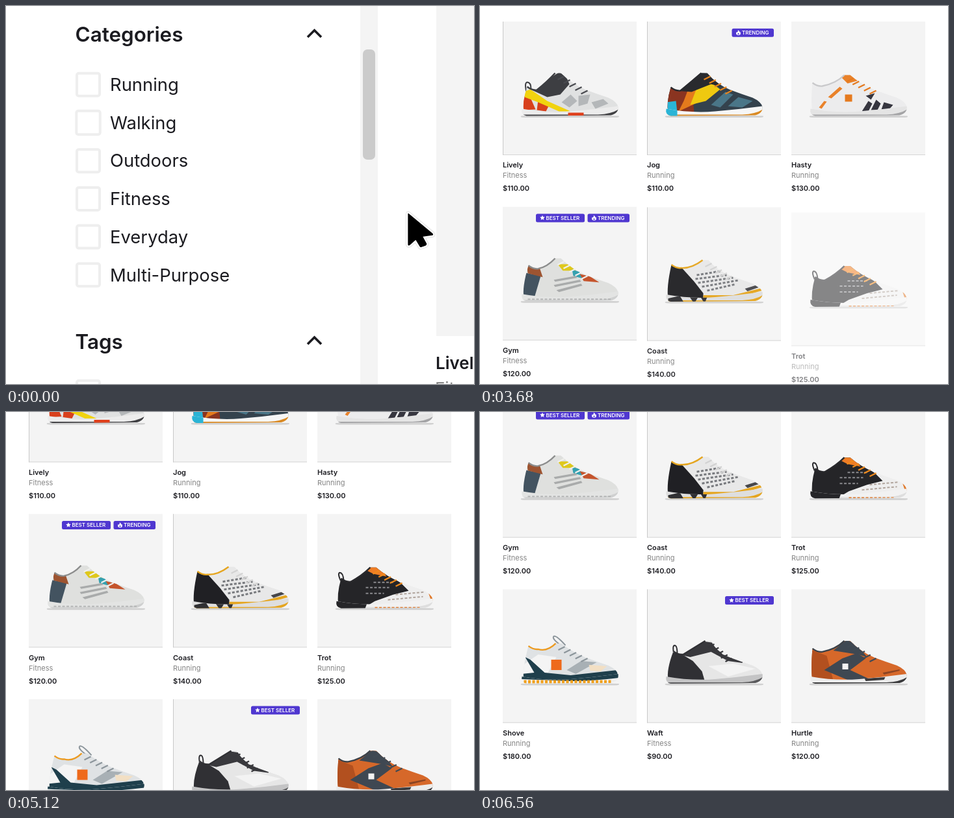
An HTML page with a canvas for the animation above (6960 ms loop, 720x583 px).

```html
<!DOCTYPE html>
<html lang="en">
<head>
<meta charset="utf-8">
<title>Shoe shop filter</title>
<style>
html, body { margin: 0; width: 720px; height: 583px; background: #fff; }
canvas { display: block; }
</style>
</head>
<body>
<canvas id="stage" width="720" height="583"></canvas>
<script>
const ctx = document.getElementById('stage').getContext('2d');
const LOOP = 6960, INK = '#1b1b20', PURPLE = '#4f37d0', PALE = '#f4f4f4';

const clamp = v => Math.min(1, Math.max(0, v));
const span = (t, a, b) => clamp((t - a) / (b - a));
const ease = t => 1 - (1 - t) ** 2 * (1 + t / 2);
const mix = (a, b, p) => a + (b - a) * p;

function fill(color, path) {
  ctx.fillStyle = color;
  ctx.fill(typeof path === 'string' ? new Path2D(path) : path);
}
function line(color, width, path) {
  ctx.strokeStyle = color;
  ctx.lineWidth = width;
  ctx.stroke(new Path2D(path));
}
function rect(color, x, y, w, h, r = 0) {
  ctx.beginPath();
  ctx.roundRect(x, y, w, h, r);
  ctx.fillStyle = color;
  ctx.fill();
}
function text(str, x, y, size, weight = 400, color = INK) {
  ctx.font = `${weight} ${size}px Inter, sans-serif`;
  ctx.fillStyle = color;
  ctx.fillText(str, x, y);
}
function at(x, y, draw) {
  ctx.save();
  ctx.translate(x, y);
  draw();
  ctx.restore();
}

// ---- Filter panel ----
const options = ['Running', 'Walking', 'Outdoors', 'Fitness', 'Everyday', 'Multi-Purpose'];
const rowY = i => 121 + i * 58.7;

function emptyBox(y, grow = 0) {
  ctx.strokeStyle = '#eeeeee';
  ctx.lineWidth = 4;
  ctx.beginPath();
  ctx.roundRect(109 - grow, y - 17.2 - grow, 35 + 2 * grow, 35 + 2 * grow, 3);
  ctx.stroke();
}
function tick(y, t, press, release) {
  const on = span(t, press, press + 150);
  if (!on) return;
  ctx.globalAlpha = on * (1 - span(t, release, release + 90)) * .25;
  ctx.beginPath();
  ctx.arc(126.3, y, mix(20, 36, on), 0, 7);
  ctx.fillStyle = PURPLE;
  ctx.fill();
  ctx.globalAlpha = on;
  rect(PURPLE, 107, y - 20, 39, 39, 3);
  line('#fff', 2.4, `M116 ${y + 1}L123 ${y + 8.5} 137 ${y - 9}`);
  ctx.globalAlpha = 1;
}
function heading(str, y) {
  text(str, 106.5, y, 31.4, 600);
  line(INK, 3.6, `M464 ${y - 7}L474.5 ${y - 17.5} 485 ${y - 7}`);
}
function cursor(x, y) {
  at(x, y, () => {
    const shape = 'M0 1Q0-1 2 1L38 31Q40 34 37 34L23 36 29 47Q29 49 27 50L21 52Q19 53 18 51L12 41 3 49Q0 51 0 48Z';
    ctx.lineJoin = 'round';
    line('#e2e2e2', 6.4, shape);
    line('#fff', 4.6, shape);
    fill('#000', shape);
  });
}
function panel(t) {
  heading('Categories', 55);
  heading('Tags', 528.5);
  options.forEach((name, i) => {
    emptyBox(rowY(i), i === 1 ? .7 : 0);
    text(name, 160, rowY(i) + 10, 27.4);
  });
  emptyBox(595);
  rect(PALE, 545, 0, 27, 583);
  rect('#cbcbcb', 549, 67, 19, 170, 7);
  rect(PALE, 662, 0, 58, 509);
  text(shoes[0].name, 661, 560, 26, 600);
  text('Fitness', 660, 599, 26, 400, '#888');
  tick(rowY(0), t, 1140, 1370);
  tick(rowY(3), t, 1930, 2190);
  const a = ease(span(t, 0, 1100)), b = ease(span(t, 1390, 1960));
  cursor(mix(619, 128, a) + 4 * b, mix(320, 126, a) + 173 * b);
}

// ---- Shoes: patches clipped to a silhouette; a third value makes a dashed line of that width ----
const shoes = [
  { name: 'Lively', kind: 'Fitness', price: 110, tags: [], heel: [9, 22], top: [57, 1],
    body: '#e0e1e1', collar: '#3d3e42', lace: '#4a4b50', mid: '#ececec', out: '#414144',
    loop: 'M9 34Q4 16 9 15 15 15 15 26',
    art: [['#d8401c', 'M2 38L12 34 22 57 3 58ZM26 42L42 52 38 60 24 58Z'],
      ['#f1d30f', 'M3 30L14 26 40 44 76 60H58L26 46 5 38Z'],
      ['#3d3e42', 'M16 27L48 6 58 0 68 4 74 18 60 34 40 38Z'],
      ['#b4b7b9', 'M62 46L76 34 86 44 74 54ZM88 36L106 34 102 48 88 52ZM108 46L126 41 134 48 114 56Z']],
    tread: [['#e0401c', 'M72 62H96V70H72Z']] },
  { name: 'Jog', kind: 'Running', price: 110, tags: ['TRENDING'], heel: [8, 23], top: [60, 1],
    body: '#34424d', collar: '#292a2e', lace: '#e8841c', mid: '#f6f6f6', out: '#d98a24',
    art: [['#8a3420', 'M0 20L40 22 44 62H0Z'], ['#e47a1c', 'M34 28L50 20 46 48 20 60 28 44Z'],
      ['#efc910', 'M48 24L72 17 84 26 62 44 38 50Z'], ['#292a2e', 'M14 28L52 0 72 2 86 22 70 18 40 30Z'],
      ['#4a7688', 'M70 50L92 30 104 34 84 54ZM96 52L112 38 134 44 118 54Z'],
      ['#2ab4d6', 'M0 46L16 44 18 62H0Z']],
    tread: [['#2ab4d6', 'M0 54H18V70H0Z']] },
  { name: 'Hasty', kind: 'Running', price: 130, tags: [], heel: [4, 16], top: [58, 4],
    body: '#ececed', collar: '#c9c9cb', lace: '#e57a1e', mid: '#e4e4e4', out: '#a4a4a6',
    art: [['#e9822a', 'M14 54L22 44 26 45 18 56ZM28 38L46 22 50 25 33 40ZM46 5L62 2 76 12 58 17Z'],
      ['#e57a1e', 'M54 34h11v11h-11z'],
      ['#36363f', 'M80 60L90 44 96 48 90 60ZM94 58L102 42 109 48 104 58ZM110 57L114 46 128 50 122 57ZM86 36L100 32 94 42Z']],
    tread: [] },
  { name: 'Gym', kind: 'Fitness', price: 120, tags: ['TRENDING', 'BEST SELLER'], heel: [11, 12], top: [57, 1],
    body: '#dfe0de', collar: '#8b8c8c', lace: '#f0f0ee', mid: '#e3e4e3', out: '#cfd0d0',
    art: [['#435360', 'M0 22L30 28 20 62H0Z'], ['#9d5431', 'M8 8L28 15 33 30 10 24Z'],
      ['#dfc81c', 'M56 10L74 10 84 20 64 20Z'], ['#35a1b0', 'M78 18L90 22 94 32 80 28Z'],
      ['#c5542c', 'M90 25L106 29 120 38 96 36Z'],
      ['#a9abab', 'M50 34L84 28 86 31 52 37ZM50 42L90 34 92 37 52 45ZM54 50L92 40 94 43 58 53Z']],
    tread: [['#b5b6b6', 'M10 64H140', 2]] },
  { name: 'Coast', kind: 'Running', price: 140, tags: [], heel: [9, 10], top: [62, 3],
    body: '#e8e8e8', collar: '#e5a51f', lace: '#d2d2d2', mid: '#dedede', out: '#e5a51f',
    art: [['#202024', 'M0 8L26 16 44 36 58 54V62H0Z'], ['#e5a51f', 'M58 57L104 57 148 46V50L106 62H58Z'],
      ['#77797d', 'M48 26L84 20M46 32L94 26M50 38L104 30M56 44L112 34M64 50L108 40', 3],
      ['#47474b', 'M122 47L138 42 143 45 126 51Z']],
    tread: [['#303033', 'M4 62L22 58 28 68H4ZM36 58L50 60 44 70ZM54 60H64L60 70Z']] },
  { name: 'Trot', kind: 'Running', price: 125, tags: [], heel: [8, 21], top: [58, 4],
    body: '#eeeeee', collar: '#29292c', lace: '#f08a1c', mid: '#f2f2f2', out: '#dedede',
    loop: 'M8 26Q2 13 6 12 11 12 12 24',
    art: [['#252528', 'M0 0H58L100 28 112 40 88 46 60 56 50 62H0Z'], ['#ee7d25', 'M46 8L56 0 70 6 78 18 58 14Z'],
      ['#8a8a8e', 'M58 27H88M46 35H82M46 44H74', 2],
      ['#b0a49c', 'M92 46L136 42M80 54L134 49', 2], ['#e07a2c', 'M142 42L150 44V56L146 54Z']],
    tread: [['#252528', 'M0 54H50L44 70H0Z'], ['#e07a2c', 'M60 66H130', 2]] },
  { name: 'Shove', kind: 'Running', price: 180, tags: [], heel: [11, 9], top: [58, 5],
    body: '#dfe2e4', collar: '#ec9b22', lace: '#8c959b', mid: '#f0f0f0', out: '#f0f0f0',
    loop: 'M64 10Q46-2 50-6 54-8 68 8',
    art: [['#f4f4f4', 'M0 40L26 22 54 26 40 52 0 60Z'], ['#1f3f4c', 'M6 26L14 30 36 50 76 54 148 46V62H0V52L20 50Z'],
      ['#ee6a1c', 'M46 30h16v16h-16z'], ['#a8b0b5', 'M70 46L92 32 116 34 84 52Z'],
      ['#f2dfc4', 'M104 38L132 40 122 48 106 47Z']],
    tread: [['#1f3f4c', 'M0 54Q40 62 76 59T150 51V58Q100 64 76 63T0 60Z'],
      ['#f0a01c', 'M4 64H140', 5]] },
  { name: 'Waft', kind: 'Fitness', price: 90, tags: ['BEST SELLER'], heel: [12, 17], top: [66, 1],
    body: '#e6e6e6', collar: '#303034', lace: '#38383c', mid: '#c4c4c5', out: '#5a5a5c',
    loop: 'M13 22Q10 8 14 8 18 8 18 22',
    art: [['#303034', 'M0 16L24 21 42 32 56 48 60 62H0Z'],
      ['#39393d', 'M20 22L60 2 74 4 88 22 120 31 118 35 96 32 70 18 38 26Z'],
      ['#f3f3f3', 'M66 40L104 36 138 44 96 56Z']],
    tread: [] },
  { name: 'Hurtle', kind: 'Running', price: 120, tags: [], heel: [4, 13], top: [58, 1],
    body: '#d6682a', collar: '#3a4149', lace: '#414a54', mid: '#ececec', out: '#3a3a3c',
    art: [['#b2501f', 'M0 14L26 24 36 62H0Z'], ['#3f4852', 'M22 46L50 28 72 20 86 28 62 46 92 60 60 62Z'],
      ['#3f4852', 'M36 16L56 0 70 4 88 26 74 22Z'], ['#f3f3f3', 'M50 36h9v9h-9z'],
      ['#8b4524', 'M112 50L138 45 138 47 114 53Z']],
    tread: [['#3a3a3c', 'M84 59L116 57 114 61 86 63Z']] }
];

const SOLE = new Path2D('M1 56Q40 63 76 60T149 52Q151 62 138 66L8 67Q-1 65 1 56Z');

function patches(list, clip) {
  ctx.save();
  ctx.clip(clip);
  ctx.setLineDash([4, 2.5]);
  for (const [color, path, width] of list) width ? line(color, width, path) : fill(color, path);
  ctx.restore();
}
function drawShoe(s) {
  const [hx, hy] = s.heel, [tx, ty] = s.top;
  const collar = `M${hx} ${hy}Q${hx + 8} ${hy + 6} ${hx + 15} ${hy + 5}Q40 ${ty + 13} ${tx - 5} ${ty}`;
  const body = new Path2D(`${collar}L${tx + 4} ${ty}Q78 18 100 27 116 33 134 39 147 45 149 53Q150 60 140 62L4 62Q1 46 ${hx} ${hy}Z`);
  fill('#d0d0d0', 'M0 67Q75 65 150 67Q152 69 146 69.5L4 69.5Q-3 69 0 67Z');
  if (s.loop) line(s.collar === '#ec9b22' ? s.lace : s.collar, 2, s.loop);
  fill(s.body, body);
  patches(s.art, body);
  line(s.collar, 2.4, collar);
  for (let k = 0; k < 5; k++) {
    const x = mix(tx + 6, 99, k / 4), y = mix(ty + 7, 30, k / 4);
    line(s.lace, 2.2, `M${x - 7} ${y + 3}L${x + 3} ${y - 2}`);
  }
  fill(s.mid, SOLE);
  patches([[s.out, 'M0 65H118Q140 64 151 56V70H0Z'], ...s.tread], SOLE);
}

// ---- Product grid ----
function star(x, y) {
  let d = '';
  for (let k = 0; k < 10; k++) {
    const a = k * Math.PI / 5, r = k % 2 ? 1.9 : 4;
    d += `${k ? 'L' : 'M'}${x + r * Math.sin(a)} ${y - r * Math.cos(a)}`;
  }
  fill('#fff', d + 'Z');
}
function flame(x, y) {
  at(x, y, () => {
    fill('#fff', 'M-.6-4Q2.2-2 2-.6L2.8-1.6Q5 4-.2 4-5 3.4-2.8-1.4L-1.6-.4Q-.4-2-.6-4Z');
    fill(PURPLE, 'M0 .4Q2.6 3-.1 3-2.4 2.6 0 .4Z');
  });
}
function drawTags(tags) {
  let right = 195;
  for (const tag of tags) {
    const hot = tag === 'TRENDING', w = hot ? 64.5 : 75, x = right - w;
    rect(PURPLE, x, 10.7, w, 13, 2.5);
    (hot ? flame : star)(x + 10, 17.1);
    text(tag, x + 15.5, 20, 8, 600, '#fff');
    right = x - 4.5;
  }
}
function card(s, i, t, scroll) {
  const p = span(t, 2760 + i * 144, 3120 + i * 144);
  if (!p) return;
  const col = i % 3, y = 24 + Math.floor(i / 3) * 285.7 - scroll + 20 * (1 - p);
  at(35 + col * 222, y, () => {
    rect(PALE, 0, 0, 206, 206);
    rect('#d6d6d6', 0, 205, 206, 1);
    if (col === 1 || i === 0) rect('#c8c8c8', 0, 0, 1, 206);
    at(28.5, 78.5, () => drawShoe(s));
    drawTags(s.tags);
    text(s.name, 0, 225.4, 11, 600);
    text(s.kind, 0, 241.4, 11, 400, '#858585');
    text(`$${s.price}.00`, 0, 261.3, 11, 600);
    // fade in from the white page
    rect(`rgba(255,255,255,${1 - p})`, -1, -1, 208, 270);
  });
}
function grid(t) {
  const scroll = 152.5 * ease(span(t, 4240, 5120)) + 169.5 * ease(span(t, 5480, 6560));
  shoes.forEach((s, i) => card(s, i, t, scroll));
}

const start = performance.now();
function frame(now) {
  const t = Math.max(0, now - start) % LOOP;
  rect('#fff', 0, 0, 720, 583);
  (t < 2640 ? panel : t < 2760 ? () => {} : grid)(t);
  requestAnimationFrame(frame);
}
frame(start);
</script>
</body>
</html>
```
